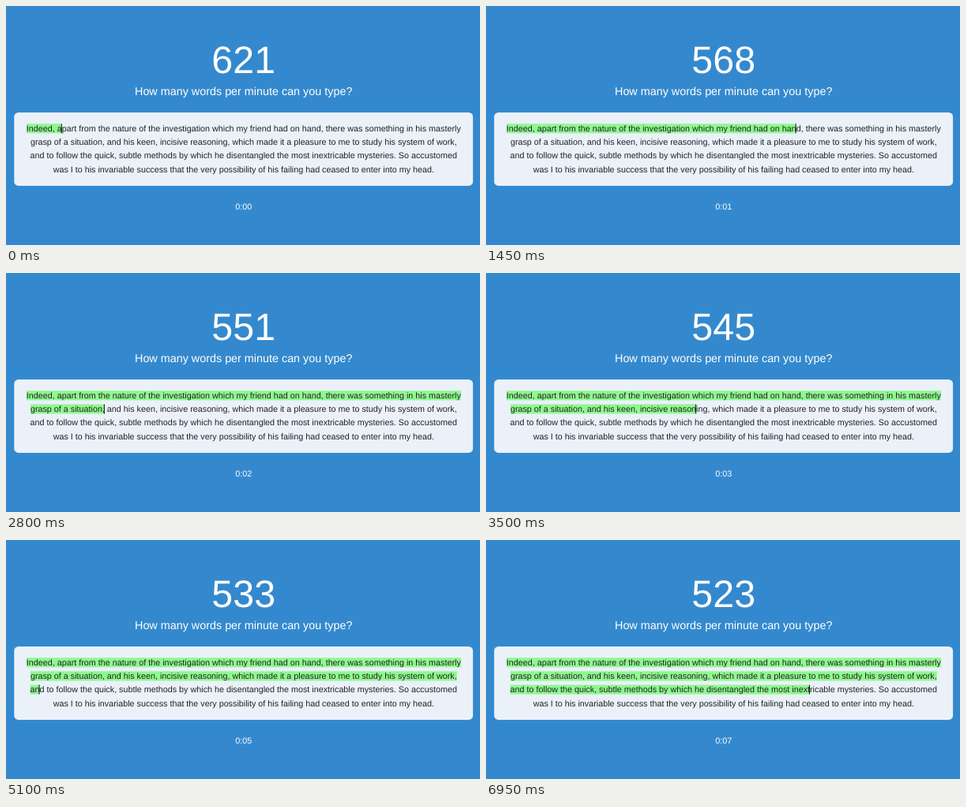
Recreate the animation shown at these times as an HTML page. Size 600x303 px, loop 7 s.

```html
<!DOCTYPE html>
<html lang="en">
<head>
<meta charset="utf-8">
<title>Typing speed</title>
<style>
  html, body { margin: 0; width: 100%; height: 100%; overflow: hidden; background: #3489ce; }
  svg { display: block; width: 600px; height: 303px; }
  text {
    font-family: "Liberation Sans", Arial, sans-serif;
    font-size: 10.78px;
    text-anchor: middle;
    text-rendering: geometricPrecision;
    fill: #fff;
  }
  #speed { font-size: 48.4px; }
  #question { font-size: 14.37px; }
  #passage text { fill: #222; }
</style>
</head>
<body>
<svg viewBox="0 0 600 303">
  <rect width="600" height="303" fill="#3489ce"/>
  <text id="speed" x="300.7" y="84.8"></text>
  <text id="question" x="300.7" y="112.9">How many words per minute can you type?</text>
  <rect x="10.3" y="134.9" width="580.8" height="93" rx="5.5" fill="#eaf1f9"/>
  <g id="marks" fill="#8ff88f"></g>
  <g id="passage"></g>
  <rect id="caret" width="1" height="12" fill="#111"/>
  <text id="clock" x="300.7" y="257.6"></text>
</svg>
<script>
const LOOP = 7000, STEP = 50, START = 0.1846;
const CENTER = 300.8, FIRST_BASELINE = 159.1, LINE_HEIGHT = 17.15, ASCENT = 9.8;

const lines = [
  "Indeed, apart from the nature of the investigation which my friend had on hand, there was something in his masterly",
  "grasp of a situation, and his keen, incisive reasoning, which made it a pleasure to me to study his system of work,",
  "and to follow the quick, subtle methods by which he disentangled the most inextricable mysteries. So accustomed",
  "was I to his invariable success that the very possibility of his failing had ceased to enter into my head."
];

// Words per minute reached after a number of typed characters.
const pace = [
  [1, 640], [9, 621], [16, 607], [28, 593], [52, 575.4], [104, 559], [137, 551],
  [196, 540], [197, 539], [234, 533], [311, 523.2]
];

const byId = id => document.getElementById(id);

function add(parent, tag, attributes) {
  const node = document.createElementNS("http://www.w3.org/2000/svg", tag);
  for (const name in attributes) node.setAttribute(name, attributes[name]);
  return parent.appendChild(node);
}

function paceAt(count) {
  const i = Math.max(1, pace.findIndex(([n]) => n >= count));
  const [n0, w0] = pace[i - 1], [n1, w1] = pace[i];
  return w0 + (w1 - w0) * (count - n0) / (n1 - n0);
}

// One word is five characters, so each keystroke lands at 12 * count / wpm seconds.
const keystrokes = Array.from({ length: pace[pace.length - 1][0] }, (_, i) => ({
  time: 12 * (i + 1) / paceAt(i + 1),
  wpm: Math.round(paceAt(i + 1))
}));

let offset = 0;
const rows = lines.map((line, i) => {
  const baseline = FIRST_BASELINE + i * LINE_HEIGHT;
  const text = add(byId("passage"), "text", { x: CENTER, y: baseline });
  text.textContent = line;
  const width = text.getComputedTextLength();
  const row = { text, offset, length: line.length, left: CENTER - width / 2, top: baseline - ASCENT };
  row.mark = add(byId("marks"), "rect", { x: row.left, y: row.top, width: 0, height: 12 });
  offset += line.length + 1;
  return row;
});

function draw(ms) {
  const elapsed = ms / 1000 + START;
  const typed = keystrokes.filter(key => key.time <= elapsed).length;
  byId("speed").textContent = keystrokes[typed - 1].wpm;
  byId("clock").textContent = "0:" + String(Math.floor(elapsed)).padStart(2, "0");

  for (const row of rows) {
    const count = Math.min(row.length, Math.max(0, typed - row.offset));
    const width = count ? row.text.getSubStringLength(0, count) : 0;
    row.mark.setAttribute("width", width);
    if (typed >= row.offset) {
      byId("caret").setAttribute("x", row.left + width - 1);
      byId("caret").setAttribute("y", row.top);
    }
  }
}

const origin = performance.now();
function tick() {
  const ms = (performance.now() - origin) % LOOP;
  draw(Math.floor(ms / STEP) * STEP);
  requestAnimationFrame(tick);
}
tick();
</script>
</body>
</html>
```
